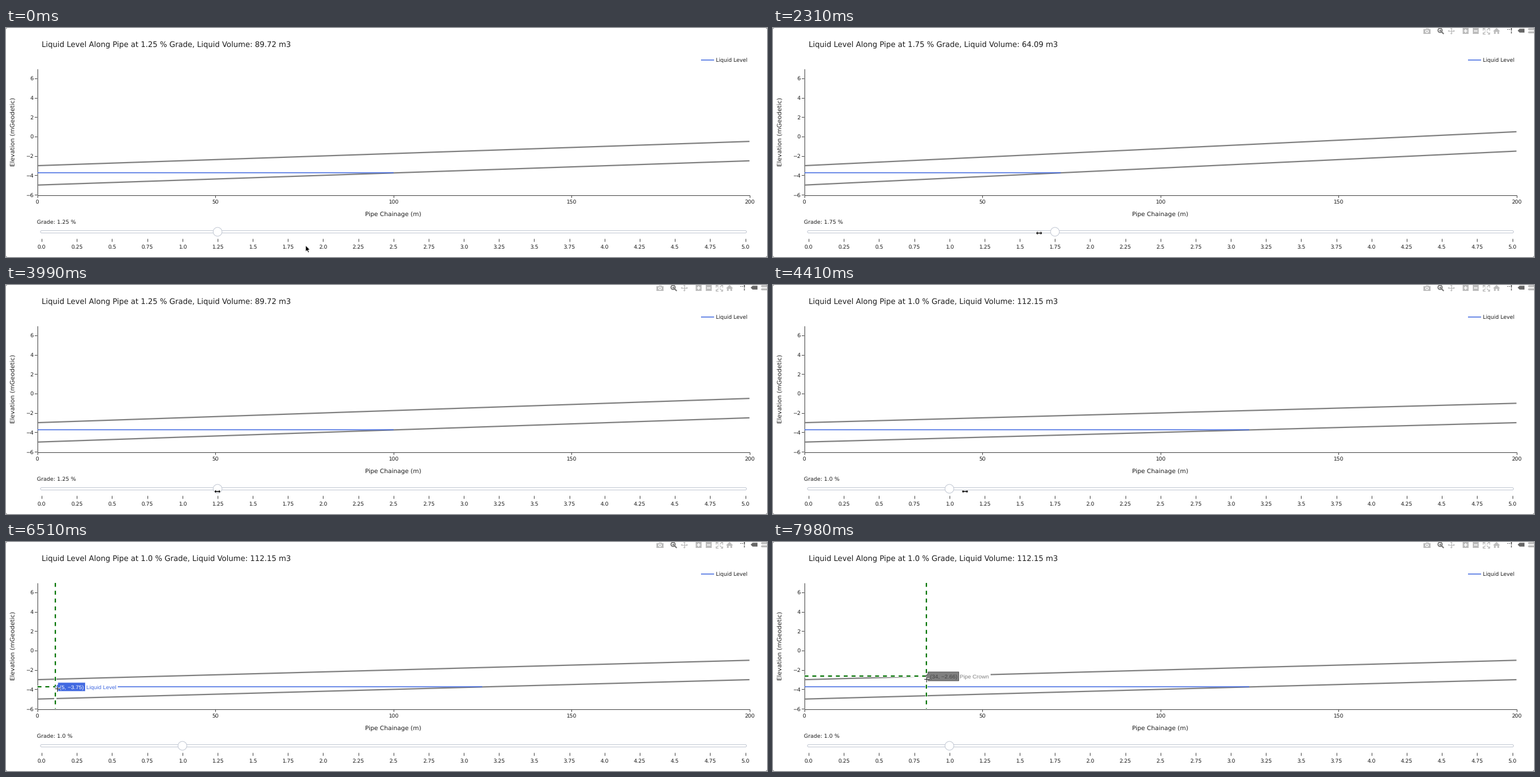
Recreate the animation shown at these times as a matplotlib script. Size 1280 by 386 pixels, loop 8 s.

```python
import numpy as np
import matplotlib.pyplot as plt
from matplotlib.animation import FuncAnimation
from matplotlib.patches import Circle, FancyBboxPatch, Polygon, Rectangle

W, H, DPI = 1280, 386, 100
PT = 72 / DPI
LOOP, INTERVAL, STEP = 8000, 40, 70

INK, AXIS, PIPE, LEVEL, SPIKE = "#1c1c1c", "#444444", "#808080", "#4169e1", "#067506"
RAIL, PALE, DARK = "#c3c9d4", "#bdbdbd", "#737373"

plt.rcParams["text.hinting"] = "none"
plt.rcParams["font.family"] = "DejaVu Sans"

fig = plt.figure(figsize=(W / DPI, H / DPI), dpi=DPI, facecolor="white")
ax = fig.add_axes([0, 0, 1, 1])
ax.set_xlim(0, W)
ax.set_ylim(H, 0)
ax.autoscale(False)
ax.axis("off")


# ---- coordinates ----
def px(chainage):
    return 52.5 + 5.99 * chainage


def py(elevation):
    return 183 - 16.35 * elevation


def slider_x(grade):
    return 60 + 236.7 * grade


# ---- drawing helpers, sizes in pixels ----
def label(x, y, s, size, ha="left", color=INK, z=3, **kw):
    return ax.text(x, y + 0.365 * size, s, fontsize=size * PT, ha=ha,
                   va="baseline", color=color, zorder=z, **kw)


def line(xs, ys, color, width, z=2, **kw):
    kw.setdefault("solid_capstyle", "butt")
    return ax.plot(xs, ys, color=color, lw=width * PT, zorder=z, **kw)[0]


def shape(points, fc, ec="none", width=0.0, z=3):
    return ax.add_patch(Polygon(points, closed=True, fc=fc, ec=ec,
                                lw=width * PT, zorder=z))


def rect(x, y, w, h, fc, z=3):
    return ax.add_patch(Rectangle((x, y), w, h, fc=fc, ec="none", zorder=z))


# ---- fixed parts of the chart ----
line([px(0), px(0)], [py(7), 281.5], AXIS, 1)
line([px(0), px(200)], [281.5, 281.5], AXIS, 1)
for v in range(-6, 7, 2):
    line([48, 52], [py(v)] * 2, AXIS, 1)
    label(46.5, py(v), str(v).replace("-", "\u2212"), 9, "right")
for v in range(0, 201, 50):
    line([px(v)] * 2, [282, 285.5], AXIS, 1)
    label(px(v), 293, str(v), 9, "center")
label(651.5, 313, "Pipe Chainage (m)", 10.3, "center")
ax.text(12, 175, "Elevation (mGeodetic)", fontsize=10.35 * PT, rotation=90,
        ha="center", va="center", color=INK)
line([1169, 1191], [54, 54], LEVEL, 1.5)
label(1194, 54, "Liquid Level", 8.85)

ax.add_patch(FancyBboxPatch((60, 343.5), 1183.5, 0.01, fc="white", ec=RAIL,
                            boxstyle="round,pad=2", lw=PT, zorder=2))
for g in np.arange(0, 5.01, 0.25):
    line([slider_x(g)] * 2, [354.5, 359.5], AXIS, 1)
    label(slider_x(g), 368.3, str(float(g)), 9, "center")

for cx, dx in ((0, 2), (W, -2)):
    for cy, dy in ((0, 2), (H, -2)):
        shape([(cx, cy), (cx + dx, cy), (cx, cy + dy)], "#999999")


# ---- toolbar at the top right ----
def ring(x, y, r, color, width):
    return ax.add_patch(Circle((x, y), r, fc="white", ec=color, lw=width * PT, zorder=4))


def build_toolbar():
    parts = [rect(1094, 2, 12, 7.5, PALE), rect(1097.5, 0.6, 5, 2, PALE),
             ring(1100, 5.6, 2.2, "white", 1.1), rect(1098.8, 4.4, 2.4, 2.4, PALE, 5)]
    parts += [ring(1122, 4, 3.5, DARK, 1.7),
              line([1124.6, 1128.2], [6.6, 10], DARK, 2),
              line([1120, 1124], [4, 4], DARK, 1.2, 5),
              line([1122, 1122], [2, 6], DARK, 1.2, 5)]
    parts += [line([1137, 1145], [5, 5], PALE, 1.2), line([1141, 1141], [1, 9], PALE, 1.2)]
    for dx, dy in ((1, 0), (-1, 0), (0, 1), (0, -1)):
        x, y = 1141 + 6 * dx, 5 + 6 * dy
        back = (x - 2.5 * dx, y - 2.5 * dy)
        parts.append(shape([(x, y), (back[0] + 2 * dy, back[1] + 2 * dx),
                            (back[0] - 2 * dy, back[1] - 2 * dx)], PALE))
    for x in (1164.5, 1182):
        parts += [rect(x - 5, 0, 10, 10, PALE), line([x - 3, x + 3], [5, 5], "white", 1.6, 4)]
    parts.append(line([1164.5, 1164.5], [2, 8], "white", 1.6, 4))
    for dx in (-1, 1):
        for dy in (-1, 1):
            x, y = 1199.5 + 5.5 * dx, 5 + 5 * dy
            parts += [line([1199.5 + dx, x], [5 + dy, y], PALE, 1.3),
                      line([x - 3.5 * dx, x, x], [y, y, y - 3.5 * dy], PALE, 1.3)]
    parts += [shape([(1211, 5.5), (1217, 0), (1223, 5.5), (1221.3, 5.5), (1221.3, 10),
                     (1218.5, 10), (1218.5, 6.5), (1215.5, 6.5), (1215.5, 10),
                     (1212.7, 10), (1212.7, 5.5)], PALE)]
    parts += [rect(1234.5, 1.5, 2, 1.8, DARK), rect(1238, 1.5, 2, 1.8, DARK),
              rect(1241, 0, 2.4, 3.6, DARK), rect(1241.4, 4.6, 1.8, 1.6, DARK),
              rect(1241.4, 7, 1.8, 1.6, DARK)]
    tags = ((1252.5, 4.5, 11.5, 3.2, "#666666"), (1269.5, 2, 12, 1.7, PALE),
            (1269.5, 7.3, 12, 1.7, PALE))
    for x, y, w, h, color in tags:
        parts.append(shape([(x, y), (x + h, y - h), (x + w, y - h),
                            (x + w, y + h), (x + h, y + h)], color))
    return parts


toolbar = build_toolbar()

# ---- moving parts ----
title = label(59.5, 28, "", 12.64)
grade_text = label(52.3, 327, "", 9.1)
handle = ax.add_patch(Circle((0, 343.5), 7.4, fc="white", ec=RAIL, lw=PT, zorder=4))
crown = line([], [], PIPE, 2.2)
invert = line([], [], PIPE, 2.2)
surface = line([], [], LEVEL, 1.5, 2.5)

spikes = []
for _ in range(2):
    case = line([], [], "white", 3.8, 4)
    dash = line([], [], SPIKE, 2.2, 5, linestyle=(0, (3, 3)), dash_capstyle="butt")
    spikes.append((case, dash))
HOVER_FONT = dict(family="Liberation Sans")
name_back = rect(0, 0, 1, 15, "white", 6)
tip_box = shape([(0, 0)], PIPE, AXIS, 0.8, 7)
tip_text = label(0, 0, "", 9.5, z=8, **HOVER_FONT)
tip_name = label(0, 0, "", 9.5, z=8, **HOVER_FONT)
hover_parts = [a for pair in spikes for a in pair] + [name_back, tip_box, tip_text, tip_name]

ARROW = np.array([(0, 0), (0, 10.5), (2.4, 8.3), (4.2, 12), (5.9, 11.2),
                  (4.2, 7.6), (7.3, 7.4)])
half = [(-5.5, 0), (-2.3, -3.6), (-2.3, -1.1)]
right = [(-x, y) for x, y in half[::-1]]
lower = [(x, -y) for x, y in half[:0:-1]]
RESIZE = np.array(half + right + [(-x, y) for x, y in lower[::-1]] + lower)
pointer = shape(ARROW, "black", "white", 0.7, 10)
cross = [line([], [], c, w, 10) for c, w in (("white", 2.4), ("white", 2.4),
                                             ("#222222", 1), ("#222222", 1))]

# time, x, y of the pointer
PATH = np.array([
    (0, 504, 366.5), (70, 425, 360), (140, 352, 353), (770, 352, 353), (910, 355, 348),
    (1540, 355.5, 348), (2380, 456, 345.5), (2520, 461.5, 345.5), (2590, 461.5, 345.5),
    (3010, 530, 346), (3220, 530, 346), (3500, 509, 347.5), (3570, 474, 348.5),
    (4060, 336, 348), (4340, 330, 348), (4410, 323, 348), (4480, 318, 348),
    (4970, 318, 348), (5320, 140, 310), (5460, 80, 286), (5600, 63, 268),
    (5670, 70, 265), (5810, 71, 264), (6160, 72, 247), (6440, 72, 247),
    (7140, 214, 247), (7210, 226, 247), (7560, 258.3, 246), (7630, 258.3, 246),
    (7980, 258.3, 231)])
GRADES = [(0, 1.25), (1820, 1.5), (2310, 1.75), (2730, 2.0), (3640, 1.75),
          (3780, 1.5), (3920, 1.25), (4410, 1.0)]
LEAVE_SLIDER = 5000


def pointer_at(t):
    return [np.interp(t, PATH[:, 0], PATH[:, k]) for k in (1, 2)]


def draw_grade(grade):
    volume = 112.154 / grade
    title.set_text(f"Liquid Level Along Pipe at {grade} % Grade, "
                   f"Liquid Volume: {volume:.2f} m3")
    grade_text.set_text(f"Grade: {grade} %")
    handle.center = (slider_x(grade), 343.5)
    for pipe, base in ((crown, -3), (invert, -5)):
        pipe.set_data([px(0), px(200)], [py(base), py(base + 2 * grade)])
    end = np.ceil(125 / grade)
    surface.set_data([px(0), px(end)], [py(-3.75)] * 2)


def draw_pointer(t, x, y):
    in_plot = y < 281
    pointer.set_visible(not in_plot)
    for part in cross:
        part.set_visible(in_plot)
    resizing = y < 351 and t < LEAVE_SLIDER
    pointer.set_xy((RESIZE if resizing else ARROW) + (x, y))
    for k, part in enumerate(cross):
        if k % 2:
            part.set_data([x, x], [y - 4.5, y + 4.5])
        else:
            part.set_data([x - 4.5, x + 4.5], [y, y])


def draw_hover(t, y, grade):
    sx = pointer_at(t - 15)[0]
    chainage = int((sx - px(0)) / 5.99)
    rise = grade / 100 * chainage
    traces = [("Pipe Crown", -3 + rise, PIPE, AXIS, AXIS),
              ("Liquid Level", -3.75, LEVEL, "white", "white"),
              ("Pipe Invert", -5 + rise, PIPE, AXIS, AXIS)]
    name, elev, fill, edge, ink = min(traces, key=lambda tr: abs(py(tr[1]) - y))
    hy = py(elev)
    shown = y < 281 and abs(hy - y) < 17
    for part in hover_parts:
        part.set_visible(shown)
    if not shown:
        return
    for part in spikes[0]:
        part.set_data([sx, sx], [py(7), 281])
    for part in spikes[1]:
        part.set_data([px(0), sx], [hy, hy])

    x = px(chainage)
    x0, base = x + 4.6, hy + 0.365 * 9.5
    tip_text.set_text(f"({chainage}, {elev:.2f})".replace("-", "\u2212"))
    tip_text.set_position((x0 + 3, base))
    tip_text.set_color(ink)
    x1 = x0 + 5.5 + tip_text.get_window_extent().width
    tip_box.set_xy([(x, hy), (x0, hy - 4.4), (x0, hy - 7.5), (x1, hy - 7.5),
                    (x1, hy + 7.5), (x0, hy + 7.5), (x0, hy + 4.4)])
    tip_box.set_facecolor(fill)
    tip_box.set_edgecolor(edge)
    tip_name.set_text(name)
    tip_name.set_position((x1 + 2, base))
    tip_name.set_color(fill)
    name_back.set_xy((x1, hy - 7.5))
    name_back.set_width(4 + tip_name.get_window_extent().width)


def update(i):
    t = STEP * round(i * INTERVAL / STEP)
    x, y = pointer_at(t)
    grade = [g for start, g in GRADES if start <= t][-1]
    draw_grade(grade)
    draw_pointer(t, x, y)
    draw_hover(t, y, grade)
    fade = float(np.clip((t - 700) / 300, 0, 1))
    for part in toolbar:
        part.set_alpha(fade)
    return []


anim = FuncAnimation(fig, update, frames=LOOP // INTERVAL, interval=INTERVAL,
                     init_func=lambda: [], repeat=True, repeat_delay=0, blit=False)
plt.show()
```
